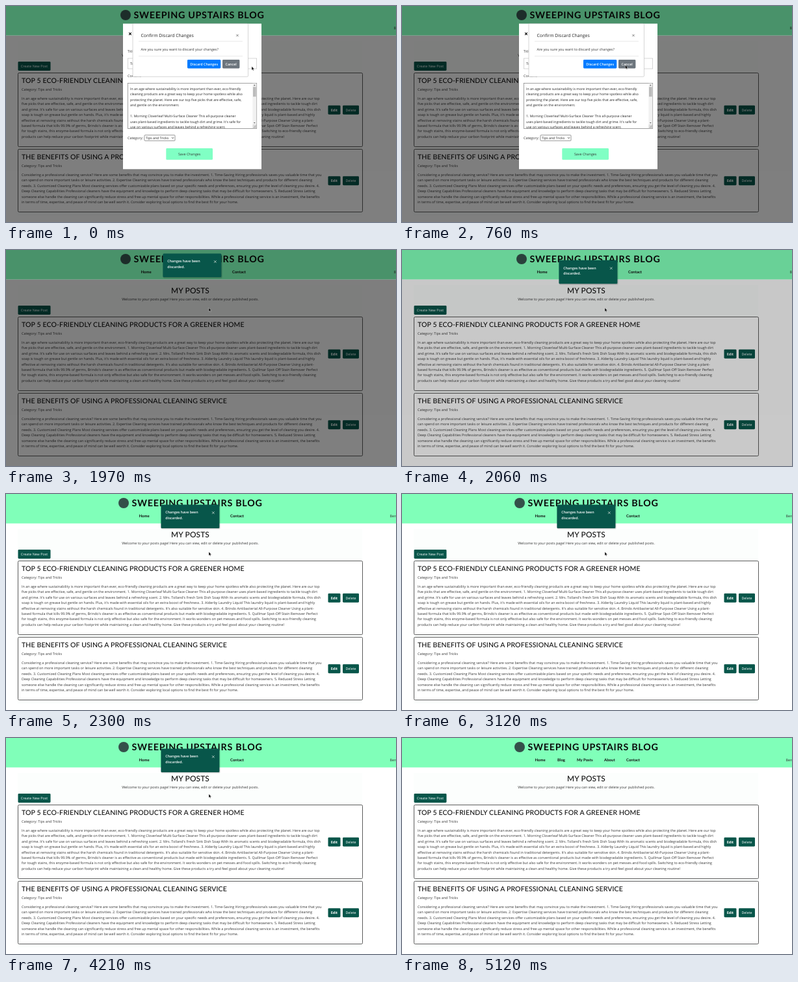
These frames come from a looping animation (600 px wide and 334 px high, 5.24 s). An HTML page:

```html
<!DOCTYPE html>
<html lang="en">
<head>
<meta charset="utf-8">
<title>Blog posts</title>
<style>
html, body { margin: 0; width: 100%; height: 100%; overflow: hidden; background: #fff; }
svg { display: block; width: 100vw; height: 100vh; }
text { font-family: "Open Sans", "Noto Sans", sans-serif; font-size: 5.39px; fill: #333; text-rendering: geometricPrecision; white-space: pre; }
.head { font-family: Lato, sans-serif; font-size: 10.5px; font-weight: 500; letter-spacing: .12px; fill: #111; }
.title { font-family: Lato, sans-serif; font-size: 14.3px; font-weight: 700; letter-spacing: .72px; fill: #0a0a0a; }
.nav { font-family: Lato, sans-serif; font-size: 6px; font-weight: 700; fill: #111; }
.mid { text-anchor: middle; }
.white { fill: #fff; }
.bold { font-weight: 700; }
.semi { font-weight: 600; }
.area { font-size: 5.15px; fill: #222; }
</style>
</head>
<body>
<svg id="stage" viewBox="0 0 600 334" preserveAspectRatio="none" xmlns="http://www.w3.org/2000/svg"></svg>
<script>
const LOOP = 5240;
const GREEN = '#08564a';
const stage = document.getElementById('stage');

const text = (x, y, str, cls = '', attrs = '') => `<text x="${x}" y="${y}" class="${cls}" ${attrs}>${str}</text>`;
const rect = (x, y, w, h, fill, attrs = '') => `<rect x="${x}" y="${y}" width="${w}" height="${h}" fill="${fill}" ${attrs}/>`;
const lines = (x, y, step, list, cls) => list.map((s, i) => text(x, y + i * step, s, cls)).join('');
const button = (x, y, w, h, fill, label, cls = 'white', attrs = '') =>
  rect(x, y, w, h, fill, `rx="1.4" ${attrs}`) + text(x + w / 2, y + h / 2 + 1.9, label, 'mid ' + cls);
const cross = (x, y, r, color, width) =>
  `<path d="M${x - r} ${y - r}l${2 * r} ${2 * r}m0 ${-2 * r}l${-2 * r} ${2 * r}" stroke="${color}" stroke-width="${width}"/>`;

const tips = [
  'In an age where sustainability is more important than ever, eco-friendly cleaning products are a great way to keep your home spotless while also protecting the planet. Here are our top',
  'five picks that are effective, safe, and gentle on the environment. 1. Morning Cloverleaf Multi-Surface Cleaner This all-purpose cleaner uses plant-based ingredients to tackle tough dirt',
  "and grime. It's safe for use on various surfaces and leaves behind a refreshing scent. 2. Mrs. Tolland's Fresh Sink Dish Soap With its aromatic scents and biodegradable formula, this dish",
  "soap is tough on grease but gentle on hands. Plus, it's made with essential oils for an extra boost of freshness. 3. Alderby Laundry Liquid This laundry liquid is plant-based and highly",
  "effective at removing stains without the harsh chemicals found in traditional detergents. It's also suitable for sensitive skin. 4. Brindo Antibacterial All-Purpose Cleaner Using a plant-",
  "based formula that kills 99.9% of germs, Brindo's cleaner is as effective as conventional products but made with biodegradable ingredients. 5. Quillmar Spot-Off Stain Remover Perfect",
  'for tough stains, this enzyme-based formula is not only effective but also safe for the environment. It works wonders on pet messes and food spills. Switching to eco-friendly cleaning',
  'products can help reduce your carbon footprint while maintaining a clean and healthy home. Give these products a try and feel good about your cleaning routine!'
];
const benefits = [
  'Considering a professional cleaning service? Here are some benefits that may convince you to make the investment. 1. Time-Saving Hiring professionals saves you valuable time that you',
  'can spend on more important tasks or leisure activities. 2. Expertise Cleaning services have trained professionals who know the best techniques and products for different cleaning',
  'needs. 3. Customized Cleaning Plans Most cleaning services offer customizable plans based on your specific needs and preferences, ensuring you get the level of cleaning you desire. 4.',
  'Deep Cleaning Capabilities Professional cleaners have the equipment and knowledge to perform deep cleaning tasks that may be difficult for homeowners. 5. Reduced Stress Letting',
  'someone else handle the cleaning can significantly reduce stress and free up mental space for other responsibilities. While a professional cleaning service is an investment, the benefits',
  'in terms of time, expertise, and peace of mind can be well worth it. Consider exploring local options to find the best fit for your home.'
];
const draft = [
  'In an age where sustainability is more important than ever, eco-friendly',
  'cleaning products are a great way to keep your home spotless while also',
  'protecting the planet. Here are our top five picks that are effective, safe,',
  'and gentle on the environment.',
  '',
  '1. Morning Cloverleaf Multi-Surface Cleaner This all-purpose cleaner',
  "uses plant-based ingredients to tackle tough dirt and grime. It's safe for",
  'use on various surfaces and leaves behind a refreshing scent.'
];

const card = (y, h, title, body) =>
  rect(18.5, y, 530, h, '#fff', 'rx="1.8" stroke="#5c5c5c"') +
  text(24, y + 15.1, title, 'head') +
  text(24, y + 27.1, 'Category: Tips and Tricks') +
  lines(24, y + 41.2, 8.45, body) +
  button(495.5, y + h / 2 - 6.8, 19, 14, GREEN, 'Edit', 'white bold') +
  button(518, y + h / 2 - 6.8, 25, 14, GREEN, 'Delete');

const page =
  rect(0, 0, 600, 334, '#fff') +
  rect(18, 54, 530, 270, '#fcfefd') +
  rect(0, 0, 600, 45.5, '#80ffb9') +
  '<g id="bar"><circle cx="181" cy="14" r="8" fill="#34504a"/>' +
  text(193.5, 19.3, 'SWEEPING UPSTAIRS BLOG', 'title') +
  [[204.5, 'Home'], [239, 'Blog'], [269, 'My Posts'], [311, 'About'], [345, 'Contact']]
    .map(([x, s]) => text(x, 36, s, 'nav')).join('') + '</g>' +
  text(590.5, 36, 'Benny', '', 'id="user"') +
  text(283.5, 66.6, 'MY POSTS', 'head mid', 'style="font-size:11.9px"') +
  text(283.5, 78.2, 'Welcome to your posts page! Here you can view, edit or delete your published posts.', 'mid') +
  button(18.5, 86, 50, 14, GREEN, 'Create New Post') +
  card(103.5, 114, 'TOP 5 ECO-FRIENDLY CLEANING PRODUCTS FOR A GREENER HOME', tips) +
  card(221.5, 97, 'THE BENEFITS OF USING A PROFESSIONAL CLEANING SERVICE', benefits);

// the header is dimmed a little less than the page
const shade = rect(0, 0, 600, 45.5, '#000', 'opacity=".85"') + rect(0, 45.5, 600, 288.5, '#000');

const editor =
  rect(180, 27.3, 213, 225, '#fff') +
  cross(191, 43, 1.8, '#000', 1.1) +
  text(187, 72, 'Title:') +
  rect(187.3, 81, 198.4, 16, '#fff', 'stroke="#bbb" stroke-width=".6"') +
  text(191, 90.8, 'Top 5 Eco-Friendly Cleaning Products for a Greener Home') +
  text(187, 110, 'Content:') +
  rect(187.3, 119.3, 198.4, 70.2, '#fff', 'stroke="#777" stroke-width=".7"') +
  '<clipPath id="box"><rect x="187.7" y="119.7" width="191" height="69.4"/></clipPath><g clip-path="url(#box)">' +
  lines(191, 129.6, 8.5, draft, 'area') + '</g>' +
  rect(379.4, 119.7, 5.9, 63.5, '#f1f1f1') + rect(380, 125.2, 4.7, 15, '#bcbcbc') +
  '<path d="M380.9 123.2l1.4-1.6 1.4 1.6zM380.9 180l1.4 1.6 1.4-1.6z" fill="#555"/>' +
  rect(379.4, 183.2, 5.9, 5.9, '#dcdcdc') +
  '<path d="M381 188.3l3.5-3.5M383 188.3l1.5-1.5" stroke="#666" stroke-width=".5"/>' +
  text(187, 206, 'Category:') +
  rect(213, 199.6, 47, 8.8, '#fff', 'rx="1" stroke="#555" stroke-width=".6"') +
  text(215, 206, 'Tips and Tricks', 'area') +
  '<path d="M255 203.2l1.5 1.6 1.5-1.6" fill="none" stroke="#222" stroke-width=".8"/>' +
  button(246.3, 220, 71.7, 17.8, '#80ffc4', 'Save Changes', '');

const confirmBox =
  rect(195, 27.3, 177.5, 82, '#fff', 'rx="1.5" stroke="#bbb" stroke-width=".6"') +
  text(207.5, 48, 'Confirm Discard Changes', '', 'style="font-size:6.9px;font-weight:500;fill:#222"') +
  cross(356, 45.5, 1.7, '#666', .8) +
  rect(204, 54, 160, .5, '#d5d5d5') + rect(204, 77, 160, .5, '#d5d5d5') +
  text(207.5, 69, 'Are you sure you want to discard your changes?') +
  button(279, 83, 51.3, 13.5, '#007bff', 'Discard Changes', 'white semi', 'id="discard"') +
  button(333, 83, 26.4, 13.5, '#6c757d', 'Cancel', 'white semi');

const toast =
  rect(238.6, 17.6, 91, 37, '#000', 'rx="2" opacity=".16"') +
  rect(238.4, 16.4, 90, 36.6, GREEN, 'rx="1.5"') +
  text(245.3, 30.3, 'Changes have been', 'white semi') +
  text(245.3, 38.7, 'discarded.', 'white semi') +
  cross(318.8, 29, 1.8, '#b9cfc6', .9);

const arrow = '<path id="arrow" d="M0 0V5.6L1.3 4.4 2.2 6.4 3.1 6 2.2 4.1H4Z" fill="#000" stroke="#fff" stroke-width=".35"/>';
const hand = '<path id="hand" d="M0 .3Q.6-.5 1.1.3V2.6L4 3.3Q4.6 3.6 4.4 4.5L3.8 7H.4L-1.6 4.4Q-1.5 3.4-.6 4L0 4.5Z" fill="#fff" stroke="#000" stroke-width=".6"/>';

stage.innerHTML = page +
  `<g id="shade">${shade}</g><g id="dialogs">${editor}${confirmBox}</g>` +
  `<g id="toast">${toast}</g><g id="cursor">${arrow}${hand}</g>`;

const part = Object.fromEntries(
  ['bar', 'user', 'shade', 'dialogs', 'discard', 'toast', 'cursor', 'arrow', 'hand'].map(id => [id, document.getElementById(id)]));

// time, x, y of the pointer tip
const track = [[0, 378, 93.5], [240, 378, 93.5], [1250, 312.3, 89.7], [1850, 312.3, 89.7], [1970, 312, 89.6],
  [3400, 312, 89.6], [4150, 312, 86.7], [4390, 312, 86.7], [4980, 318, -9], [LOOP, 318, -9]];

const ramp = (t, from, span) => Math.min(1, Math.max(0, (t - from) / span));
const smooth = p => p * p * (3 - 2 * p);
const move = (el, x, y) => el.setAttribute('transform', `translate(${x.toFixed(2)} ${y.toFixed(2)})`);
const show = (el, on) => el.setAttribute('opacity', +on);

function pointer(t) {
  let i = 1;
  while (i < track.length - 1 && t >= track[i][0]) i++;
  const [t0, x0, y0] = track[i - 1], [t1, x1, y1] = track[i];
  const p = smooth(ramp(t, t0, t1 - t0));
  return [x0 + (x1 - x0) * p, y0 + (y1 - y0) * p];
}

function draw(t) {
  // the page scrollbar returns once the shade is gone
  const shift = t < 2140 ? 3 : 0;
  move(part.bar, shift, 0);
  move(part.user, shift * 2, 0);
  show(part.shade, .5 * (1 - ramp(t, 1975, 150)));
  show(part.dialogs, 1 - ramp(t, 1875, 75));

  const leave = ramp(t, 4930, 150);
  move(part.toast, shift, -17.5 * (1 - smooth(ramp(t, 1890, 195))) - 17.5 * smooth(leave));
  show(part.toast, ramp(t, 1890, 70) * (1 - leave));

  const [x, y] = pointer(t);
  const over = t < 1890 && x < 330 && y > 83 && y < 96.5;
  move(part.cursor, x, y);
  show(part.arrow, !over);
  show(part.hand, over);
  part.discard.setAttribute('fill', over ? '#0069d9' : '#007bff');
}

const start = performance.now();
function tick() {
  draw((performance.now() - start) % LOOP);
  requestAnimationFrame(tick);
}
draw(0);
requestAnimationFrame(tick);
</script>
</body>
</html>
```
